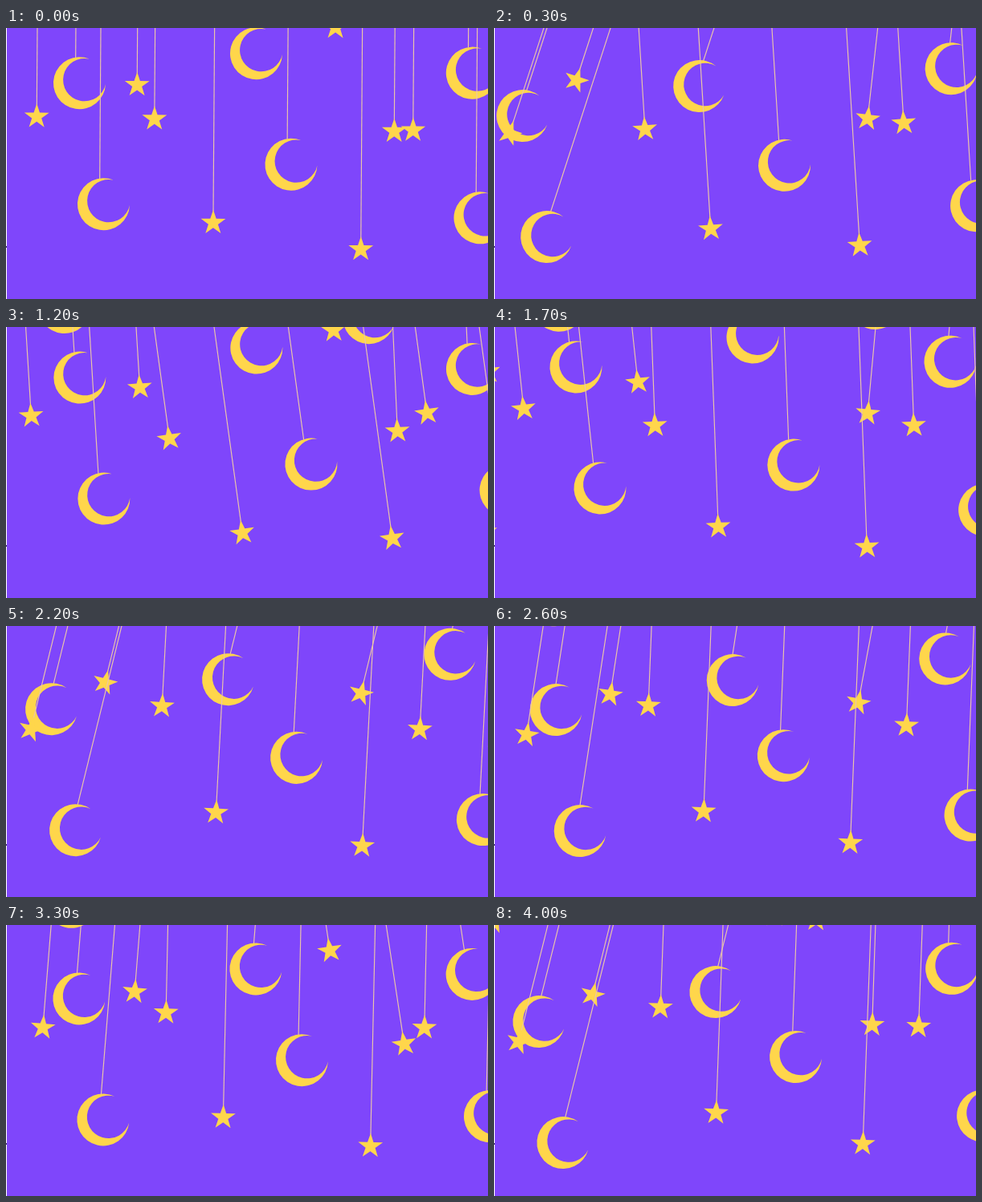
Write an HTML page with a canvas that moves like this. It is 600 px wide and 338 px high and loops after 4.1 s.

```html
<!DOCTYPE html>
<html lang="en">
<head>
<meta charset="utf-8">
<title>Hanging moons and stars</title>
<style>
  html, body { margin: 0; width: 100%; height: 100%; overflow: hidden; background: #7f46fb; }
  canvas { display: block; }
</style>
</head>
<body>
<canvas id="stage" width="600" height="338"></canvas>
<script>
const ctx = document.getElementById('stage').getContext('2d');
const LOOP = 4.1, STEP = 0.1; // seconds
const PURPLE = '#7f46fb', YELLOW = '#ffd64b', STRING = '#ecc6a8';

const moon = new Path2D('M12-30.2A32.5 32.5 0 1 0 32.5 1A26.7 26.7 0 1 1 12-30.2Z');
const star = new Path2D();
for (let i = 0; i < 10; i++) {
  const r = i % 2 ? 6.3 : 16.2, a = i * Math.PI / 5;
  star.lineTo(r * Math.sin(a), 0.4 - r * Math.cos(a));
}
star.closePath();

// One mobile: ornaments placed around its pivot.
const ornaments = [
  [star, -216, 19], [star, -142, 148], [moon, -45.5, 75],
  [star, 42, 180], [star, 106, 31], [moon, 190, 140]
];

// A drifting coordinate: steady speed plus a wave that crests at time `peak`.
const drift = (base, speed, height = 0, period = 1, peak = 0) =>
  t => base + speed * t + height * Math.cos(2 * Math.PI * (t - peak) / period);

// Each swing: pivot path, [seconds, degrees] keys, offsets of its copies.
const swings = [
  {
    x: drift(123.2, 0, 10, 4.2, 3.1),
    y: drift(-116.5, 5.2, 10, 1.55, 1.35),
    angles: [[0, 0.4], [0.3, 18], [0.7, 1], [1.2, -3.5], [1.55, -10],
      [2.2, 13.8], [2.45, 18], [2.9, -10.9], [3.3, 4.6], [4, 14]],
    copies: [[0, 0], [-220, 37], [-190, 188]]
  },
  {
    x: drift(312, -0.8),
    y: drift(-204, 2.7),
    angles: [[0, 4], [0.7, 16], [1.2, 17], [2.2, 3], [4, 0.5]],
    copies: [[0, 0]]
  },
  {
    x: drift(622.3, -1.8, 4, 1.4),
    y: drift(-23, 0, 4.5, 3.6, 0.1),
    angles: [[0, 0.4], [0.7, 11.2], [1.2, -2.5], [2.2, 13.6], [2.9, 4.7], [3.3, -8.6], [4, 1.9]],
    copies: [[0, 0]]
  },
  {
    x: drift(406.3, 3, 5.5, 2.6, 1.4),
    y: drift(92, 0, 3.5, 1.75),
    angles: [[0, 0.4], [0.7, -7.9], [1.2, -7.8], [2.2, 3], [2.9, 1.1], [4, 2.1]],
    copies: [[0, 0]]
  }
];

// Smooth curve through [time, value] keys.
function spline(keys, t) {
  const last = keys.length - 1;
  const slope = i => {
    const a = keys[Math.max(i - 1, 0)], b = keys[Math.min(i + 1, last)];
    return (b[1] - a[1]) / (b[0] - a[0]);
  };
  let i = 0;
  while (i < last - 1 && t >= keys[i + 1][0]) i++;
  const [t0, a] = keys[i], [t1, b] = keys[i + 1];
  const span = t1 - t0, u = (t - t0) / span, v = 1 - u;
  return v * v * (1 + 2 * u) * a + u * u * (1 + 2 * v) * b
    + span * u * v * (v * slope(i) - u * slope(i + 1));
}

function drawMobile(x, y, degrees) {
  ctx.save();
  ctx.translate(x, y);
  ctx.rotate(degrees * Math.PI / 180);
  for (const [shape, px, py] of ornaments) {
    const [side, top] = shape === moon ? [5, 31.5] : [0, 14];
    ctx.beginPath();
    ctx.moveTo(px - side, -700);
    ctx.lineTo(px - side, py - top);
    ctx.stroke();
    ctx.save();
    ctx.translate(px, py);
    ctx.fill(shape);
    ctx.restore();
  }
  ctx.restore();
}

function draw(t) {
  ctx.fillStyle = PURPLE;
  ctx.fillRect(0, 0, 600, 338);
  ctx.fillStyle = YELLOW;
  ctx.strokeStyle = STRING;
  ctx.lineWidth = 1.15;
  for (const { x, y, angles, copies } of swings) {
    const degrees = spline(angles, t);
    for (const [dx, dy] of copies) drawMobile(x(t) + dx, y(t) + dy, degrees);
  }
  // Left edge of the picture
  ctx.fillStyle = '#fff';
  ctx.fillRect(0, 0, 1, 338);
  ctx.fillStyle = '#3a2a66';
  ctx.fillRect(0, 272, 1, 2);
}

const start = performance.now();
function tick() {
  const t = (performance.now() - start) / 1000 % LOOP;
  draw(Math.floor(t / STEP) * STEP);
  requestAnimationFrame(tick);
}
tick();
</script>
</body>
</html>
```
